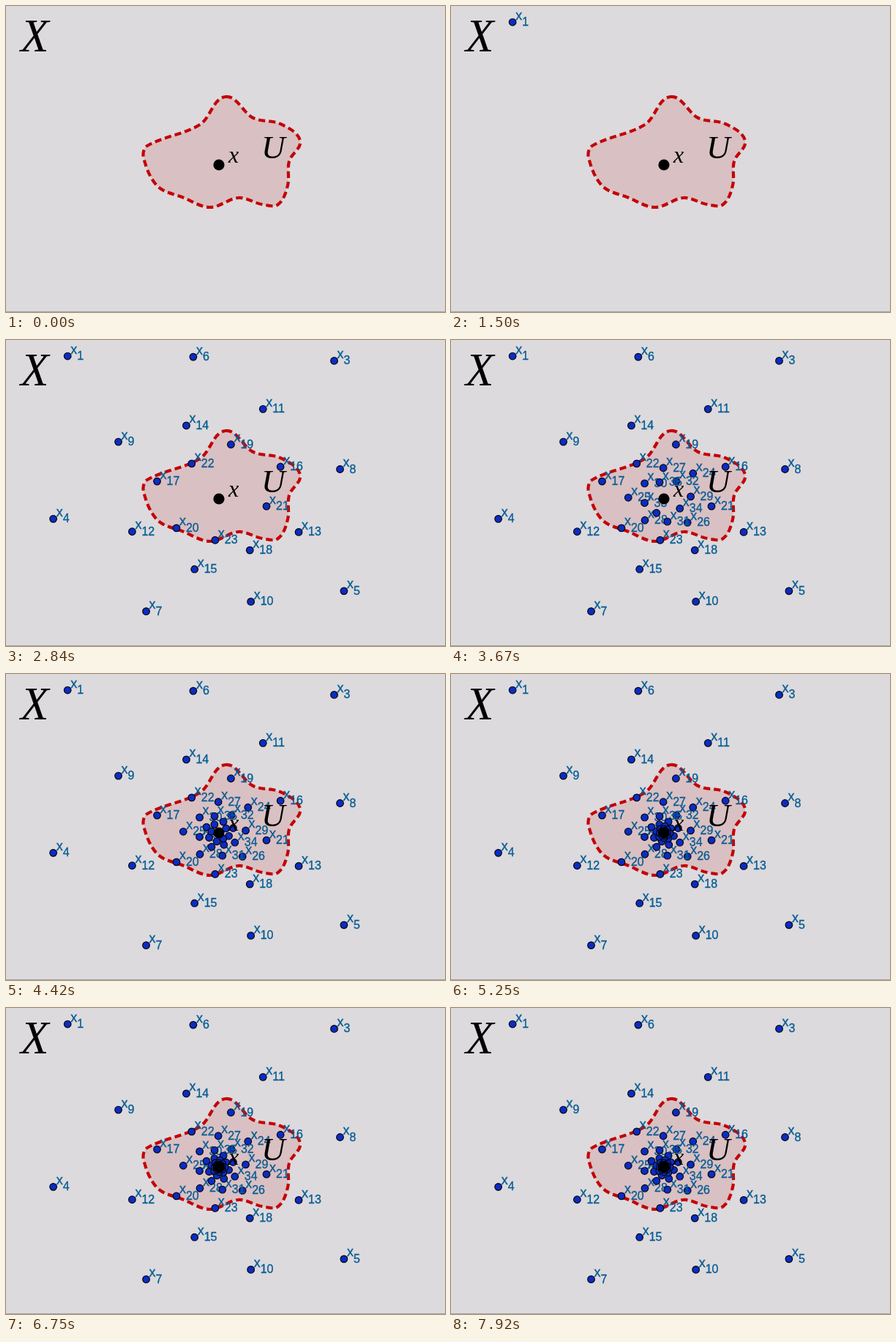
An HTML page for the animation above (8000 ms loop, 600 px wide and 418 px high).

```html
<!DOCTYPE html>
<html lang="en">
<head>
<meta charset="utf-8">
<title>Convergence of a sequence</title>
<style>
  html, body { margin: 0; width: 100%; height: 100%; overflow: hidden; background: #dcdadd; }
  svg { display: block; width: 100vw; height: 100vh; }
  .math { font-family: "Liberation Serif", serif; font-style: italic; fill: #000; }
  .label { font-family: "Liberation Sans", Arial, sans-serif; fill: #075c93; stroke: #075c93; stroke-width: 0.35; }
</style>
</head>
<body>
<svg viewBox="0 0 600 418">
  <rect width="600" height="418" fill="#dcdadd"/>
  <rect y="417" width="600" height="1" fill="#a3a2a4"/>
  <path id="region" fill="#d9c0c3" stroke="#c40306" stroke-width="4.2" stroke-dasharray="9.2 5"/>
  <g id="points"></g>
  <circle cx="291" cy="217" r="7.6"/>
  <text class="math" x="20" y="62" font-size="63">X</text>
  <text class="math" x="304" y="214" font-size="32">x</text>
  <text class="math" x="349" y="208" font-size="45">U</text>
</svg>
<script>
const LOOP = 8000, FPS = 12;
const FIRST_STEP = 18, PER_STEP = 1.31;
const TOTAL = 80, LABELLED = 35;
const LIMIT = { x: 291.2, y: 217 };
const RADIUS = 306, SHRINK = 0.9293, TURN = 223.28 * Math.PI / 180;

const outline = [
  [300, 124], [338, 153], [375, 161], [402, 184], [387, 212],
  [385, 245], [372, 271], [350, 271], [318, 262], [279, 275],
  [243, 262], [207, 246], [188, 207], [193, 191], [265, 162]
];

// Closed curve whose tangent at each point is parallel to its neighbours' chord.
function smoothLoop(pts) {
  const at = i => pts[(i + pts.length) % pts.length];
  const handle = (i, reach) => {
    const [x, y] = at(i), [ax, ay] = at(i - 1), [bx, by] = at(i + 1);
    const k = reach / Math.hypot(bx - ax, by - ay);
    return [x + (bx - ax) * k, y + (by - ay) * k];
  };
  let d = `M${pts[0]}`;
  pts.forEach(([x, y], i) => {
    const next = at(i + 1);
    const reach = Math.hypot(next[0] - x, next[1] - y) / 3;
    d += `C${handle(i, reach)} ${handle(i + 1, -reach)} ${next}`;
  });
  return d + "Z";
}

function add(parent, tag, attrs, text = "") {
  const el = document.createElementNS("http://www.w3.org/2000/svg", tag);
  for (const key in attrs) el.setAttribute(key, attrs[key]);
  el.textContent = text;
  return parent.appendChild(el);
}

// Term n lies on a spiral that shrinks geometrically into the limit.
function addTerm(n) {
  const r = RADIUS * SHRINK ** n;
  const x = LIMIT.x + r * Math.cos(n * TURN);
  const y = LIMIT.y + r * Math.sin(n * TURN);
  const g = add(document.getElementById("points"), "g", { visibility: "hidden" });
  add(g, "circle", { cx: x, cy: y, r: 4.8, fill: "#0b2cc4", stroke: "#05060c", "stroke-width": 1.2 });
  if (n <= LABELLED) {
    add(g, "text", { class: "label", x: x + 4, y: y - 3.5, "font-size": 18 }, "x");
    add(g, "text", { class: "label", x: x + 13, y: y + 5, "font-size": 16 }, n);
  }
  return g;
}

document.getElementById("region").setAttribute("d", smoothLoop(outline));
const terms = Array.from({ length: TOTAL }, (_, i) => addTerm(i + 1));

function render(ms) {
  const step = Math.floor(ms * FPS / 1000 + 0.001);
  const count = step < FIRST_STEP ? 0 : Math.floor(2.1 + PER_STEP * (step - FIRST_STEP));
  terms.forEach((g, i) => g.setAttribute("visibility", i < count ? "visible" : "hidden"));
}

const start = performance.now();
function tick(now) {
  render(Math.max(0, now - start) % LOOP);
  requestAnimationFrame(tick);
}
render(0);
requestAnimationFrame(tick);
</script>
</body>
</html>
```
